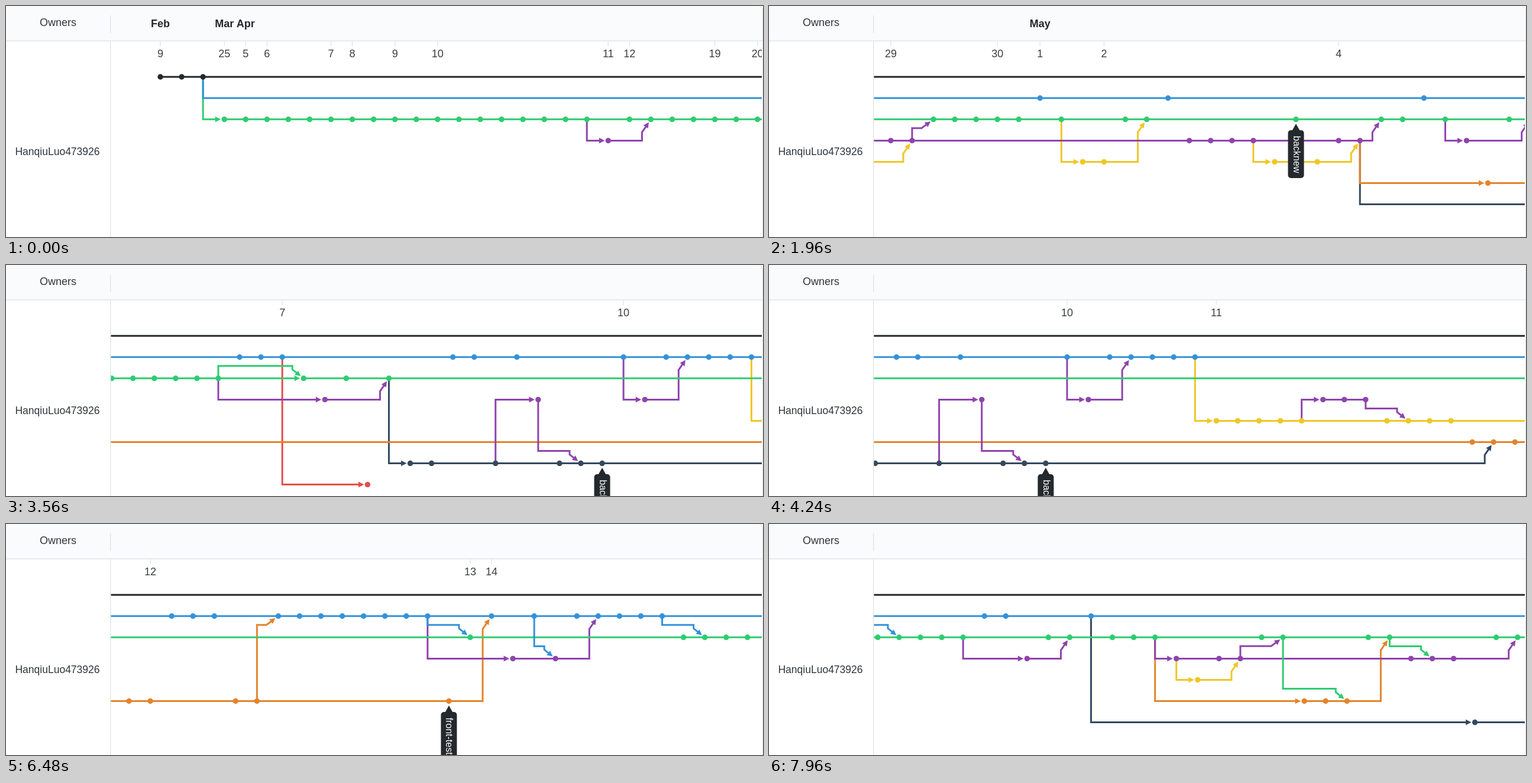
Recreate the animation shown at these times as an HTML page with a canvas. Size 1280x392 px, loop 8 s.

```html
<!DOCTYPE html>
<html lang="en">
<head>
<meta charset="utf-8">
<title>Branch network</title>
<style>
  html, body { margin: 0; width: 100%; height: 100%; overflow: hidden; background: #fff; }
  canvas { display: block; width: 1280px; height: 392px; }
</style>
</head>
<body>
<canvas id="stage" width="1280" height="392"></canvas>
<script>
const ctx = document.getElementById('stage').getContext('2d');
const LOOP = 8000, STEP = 40, PITCH = 36.06;
const LEFT = 177, RIGHT = 1278, ORIGIN = 261;
const FONT = '"Liberation Sans", Arial, sans-serif';
const INK = '#24292e', RULE = '#e1e4e8';
const ROWS = 'kbgpyodr';
const COLORS = [INK, '#3492d9', '#2ecc71', '#8e44ad', '#efc726', '#e4842b', '#34495e', '#e0504a'];

// Commit log, one column per commit. A letter is a row, a count repeats it,
// "<x~n" forks from the nth-last commit of x, "+x" merges x, "#name" tags,
// "@day" and month names label the next column.
const LOG = `
  Feb @9 k3 Mar @25 g<k Apr @5 g @6 g3 @7 g @8 g2 @9 g2 @10 g8 @11 p<g @12 g g+p g2
  @19 g2 @20 g5 @25 g2 @26 g3 @27 g p<g~1 p2 @28 p2 y<p b<k k @29 p p+y g+p g2 @30 g2
  May @1 b g y<g @2 y g g+y b p4 y<p g#backnew y @4 p p+y g+p g b g p<g o<p~1 g g+p
  @5 d<p~1#front @6 g9 b2 @7 b g<g+g p<g~1 g r<b g+p d<g d b2 d b p<d d d+p d#backnew
  @10 b p<b b b+p b3 @11 y<b y4 p<y p2 y y+p y2 o o+d o2 p<o o o+p o3 b b+y o b o2
  @12 o b3 o2 b+o b7 o#front-test @13 g+b @14 b+o p<b~1 b p+b b b+p b3 g g+b g3 b2
  p<g g g+p b g3 p<g y<p p p+y g g+p o<g~2 o o+g g g+o p p+g p d<b g g+p k b d g`;

// Drags of the view: start time, end time, scroll reached.
const DRAGS = [
  [160, 760, 620], [880, 1360, 1249], [1520, 2040, 1784], [2080, 2600, 2318],
  [2760, 3240, 2878], [3400, 3880, 3500], [4000, 4760, 3836], [4920, 5520, 4336],
  [5680, 6120, 4943], [6320, 6720, 5393], [6880, 7240, 5692], [7360, 7960, 6063]
];

const colX = col => ORIGIN + col * PITCH;
const rowY = row => 120.2 + row * PITCH;

function readLog(log) {
  const commits = [], days = [], months = [];
  const latest = (letter, back = 0) =>
    commits.filter(c => c.row === ROWS.indexOf(letter)).at(-1 - back);
  for (const token of log.trim().split(/\s+/)) {
    const x = colX(commits.length);
    if (token[0] === '@') { days.push({ x, text: token.slice(1) }); continue; }
    if (/^[A-Z]/.test(token)) { months.push({ x, text: token }); continue; }
    const [, letter, count, from, back, merged, tag] =
      token.match(/^(\w)(\d*)(?:<(\w)(?:~(\d))?)?(?:\+(\w))?(?:#(.+))?$/);
    for (let i = 0; i < (count || 1); i++) {
      const row = ROWS.indexOf(letter), previous = latest(letter);
      const commit = { row, x: colX(commits.length), y: rowY(row), merges: [], tag };
      if (from) commit.fork = latest(from, Number(back || 0));
      else if (previous) previous.next = commit;
      if (merged) latest(merged).merges.push(commit);
      commits.push(commit);
    }
  }
  return { commits, days, months };
}

const { commits, days, months } = readLog(LOG);
const lowestFirst = [...commits].sort((a, b) => b.row - a.row);

function scrollAt(time) {
  let scroll = 0;
  for (const [start, end, target] of DRAGS) {
    if (time <= start) break;
    const p = Math.min(1, (time - start) / (end - start));
    scroll += (target - scroll) * p * p * (3 - 2 * p);
  }
  return scroll;
}

// Polyline whose last leg ends in an arrowhead just short of the final point.
function arrowPath(points) {
  const [x, y] = points.at(-1), [px, py] = points.at(-2);
  const angle = Math.atan2(y - py, x - px);
  ctx.beginPath();
  points.slice(0, -1).forEach(p => ctx.lineTo(...p));
  ctx.lineTo(x - 12 * Math.cos(angle), y - 12 * Math.sin(angle));
  ctx.stroke();
  ctx.save();
  ctx.translate(x, y);
  ctx.rotate(angle);
  ctx.beginPath();
  ctx.moveTo(-6, 0);
  ctx.lineTo(-15.5, -4.8);
  ctx.lineTo(-15.5, 4.8);
  ctx.fill();
  ctx.restore();
}

function drawMerge({ row, x, y, next }, to) {
  let bend;
  if (to.row >= row) bend = [[x, to.y - 21], [to.x - 19, to.y - 21], [to.x - 19, to.y - 15]];
  else if (next) bend = [[x, to.y + 15], [to.x - 20, to.y + 15]];
  else bend = [[to.x - 15, y], [to.x - 15, to.y + 22]];
  arrowPath([[x, y], ...bend, [to.x, to.y]]);
}

function drawLinks(commit) {
  const { row, x, y, fork, next, merges } = commit;
  ctx.strokeStyle = ctx.fillStyle = COLORS[row];
  if (fork) arrowPath([[fork.x, fork.y], [fork.x, y], [x, y]]);
  if (next) {
    ctx.beginPath();
    ctx.moveTo(x, y);
    ctx.lineTo(next.x, y);
    ctx.stroke();
  }
  merges.forEach(to => drawMerge(commit, to));
}

function drawDot({ row, x, y }) {
  ctx.fillStyle = COLORS[row];
  ctx.beginPath();
  ctx.arc(x, y, 4.7, 0, Math.PI * 2);
  ctx.fill();
}

function drawTag({ x, y, tag }) {
  ctx.save();
  ctx.translate(x, y);
  ctx.font = `16px ${FONT}`;
  ctx.fillStyle = INK;
  ctx.beginPath();
  ctx.moveTo(0, 7.5);
  ctx.lineTo(7, 20);
  ctx.lineTo(-7, 20);
  ctx.fill();
  ctx.beginPath();
  ctx.roundRect(-13.5, 18.5, 27, ctx.measureText(tag).width + 18, 5);
  ctx.fill();
  ctx.rotate(Math.PI / 2);
  ctx.fillStyle = '#fff';
  ctx.textAlign = 'left';
  ctx.fillText(tag, 28, 0);
  ctx.restore();
}

function drawText(text, x, y, size = 18, weight = '') {
  ctx.font = `${weight} ${size}px ${FONT}`;
  ctx.fillText(text, x, y);
}

function drawFrame() {
  ctx.fillStyle = '#fff';
  ctx.fillRect(0, 0, 1280, 392);
  ctx.strokeStyle = RULE;
  ctx.lineWidth = 1;
  ctx.fillStyle = '#fafbfc';
  ctx.beginPath();
  ctx.roundRect(-20, -0.5, 1299.5, 420, 8);
  ctx.save();
  ctx.clip();
  ctx.fillRect(0, 0, 1280, 59);
  ctx.restore();
  ctx.stroke();
  ctx.fillStyle = RULE;
  ctx.fillRect(0, 58.5, 1279, 1.4);
  ctx.fillRect(176, 16, 1.4, 30);
  ctx.fillRect(176, 60, 1.4, 332);
  ctx.fillStyle = '#30353a';
  drawText('Owners', 88, 29);
  drawText('HanqiuLuo473926', 87, 248, 17.5);
}

function drawDates() {
  for (const { x, text } of days) {
    ctx.fillStyle = RULE;
    ctx.fillRect(x - 0.7, 60, 1.4, 8);
    ctx.fillStyle = '#3a3f44';
    drawText(text, x, 82);
  }
  ctx.fillStyle = INK;
  for (const { x, text } of months) drawText(text, x, 31, 18, 'bold');
}

function render(time) {
  ctx.textAlign = 'center';
  ctx.textBaseline = 'middle';
  drawFrame();
  ctx.save();
  ctx.beginPath();
  ctx.rect(LEFT + 0.5, 0, RIGHT - LEFT - 0.5, 392);
  ctx.clip();
  ctx.translate(-scrollAt(time), 0);
  drawDates();
  ctx.lineWidth = 3;
  lowestFirst.forEach(drawLinks);
  commits.forEach(drawDot);
  commits.filter(c => c.tag).forEach(drawTag);
  ctx.restore();
}

const begin = performance.now();
function tick() {
  const time = (performance.now() - begin) % LOOP;
  render(Math.floor(time / STEP) * STEP);
  requestAnimationFrame(tick);
}
tick();
</script>
</body>
</html>
```
